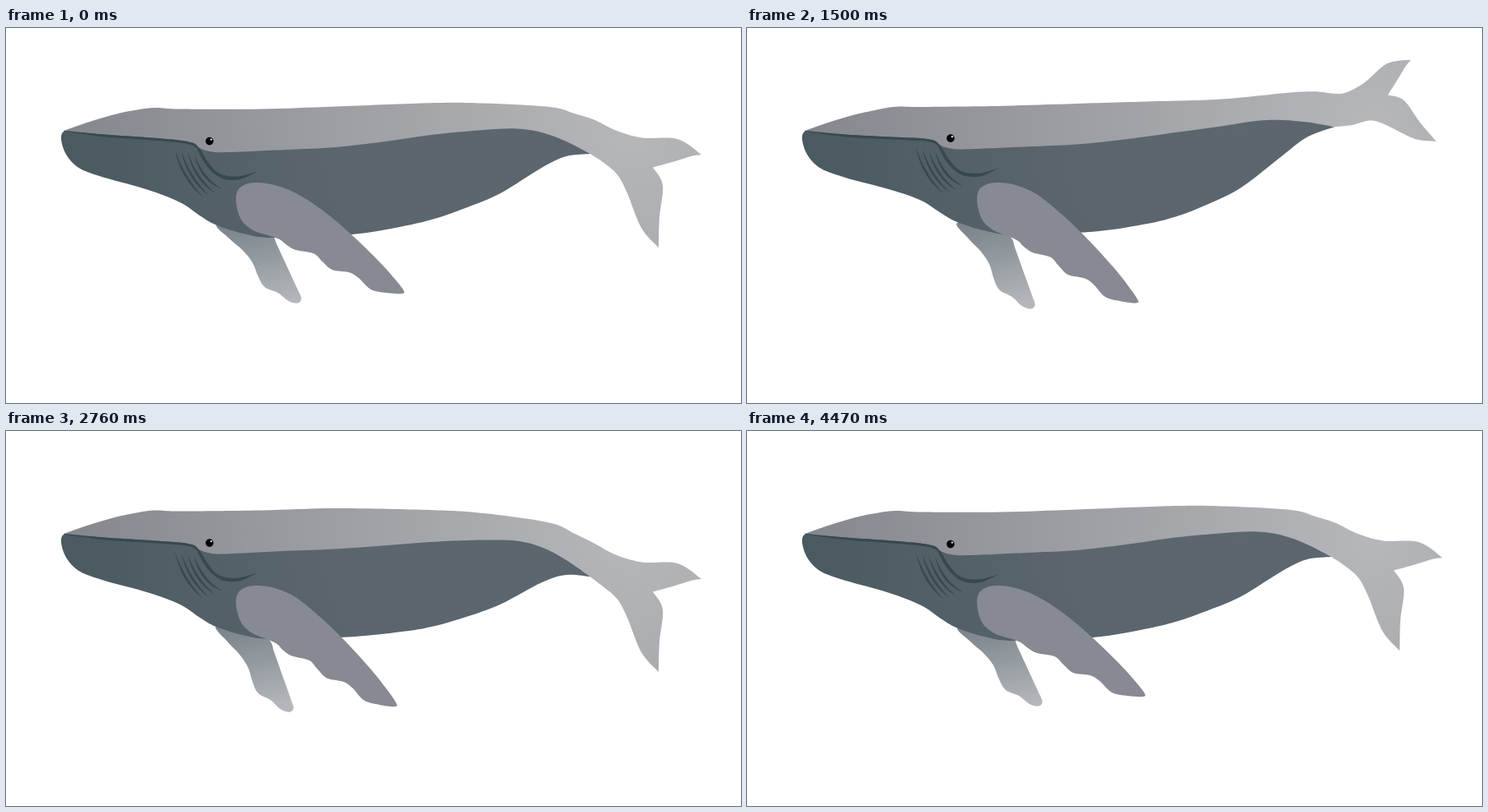
These frames come from a looping animation (892x456 px, 4.5 s). An HTML page:

```html
<!DOCTYPE html>
<html lang="en">
<head>
<meta charset="utf-8">
<title>Swimming whale</title>
<style>
html, body { margin: 0; width: 100%; height: 100%; overflow: hidden; background: #fff; }
svg { display: block; width: 100%; height: 100%; }
</style>
</head>
<body>
<svg viewBox="0 0 892 456" xmlns="http://www.w3.org/2000/svg">
  <defs>
    <radialGradient id="skin" gradientUnits="userSpaceOnUse" cx="760" cy="125" r="690">
      <stop offset="0" stop-color="#b6b7bb"/>
      <stop offset=".2" stop-color="#acaeb2"/>
      <stop offset=".4" stop-color="#a2a4a8"/>
      <stop offset=".75" stop-color="#92949a"/>
      <stop offset="1" stop-color="#84878d"/>
    </radialGradient>
    <radialGradient id="dark" gradientUnits="userSpaceOnUse" cx="600" cy="120" r="560">
      <stop offset="0" stop-color="#5c666e"/>
      <stop offset=".38" stop-color="#5b656d"/>
      <stop offset="1" stop-color="#48595f"/>
    </radialGradient>
    <linearGradient id="shade" gradientUnits="userSpaceOnUse" x1="290" y1="238" x2="312" y2="338">
      <stop offset="0" stop-color="#7b858b"/>
      <stop offset="1" stop-color="#b3b6ba"/>
    </linearGradient>
  </defs>
  <path id="farFin" fill="url(#shade)"/>
  <path id="top" fill="url(#skin)"/>
  <path id="belly" fill="url(#dark)"/>
  <path id="mouth" fill="#37494f"/>
  <path id="folds" fill="#37494f"/>
  <g id="eye">
    <circle r="4.8" fill="#050505"/>
    <circle cx="2" cy="-2" r="1.2" fill="#ddd"/>
  </g>
  <path id="fin" fill="#878a92"/>
</svg>
<script>
const LOOP = 4500, STEP = 30, SPAN = 4470;

// time, then heights of head, middle, loin and tail stock, fluke angle, fin swing
const keys = [
  [0, 0, 0, 0, 0, 0, 0],
  [1080, -4.5, -6, -10, -23, -30, .54],
  [1500, -3.5, -3, -13, -36, -42, .72],
  [1960, -2.7, -1, -16, -56, -54, .94],
  [2280, -2, 3, 0, -23, -35, 1],
  [2760, -1.5, 6.5, 13, 26, 0, .76],
  [3750, -.5, 4, 9.5, 23, 2, .33]
];
const joints = [150, 250, 400, 540, 640, 720];
const pivot = [715, 135];

// Outline at rest.
const back = [
  [70, 125], [100, 114.5], [130, 105.5], [153, 100.5], [180, 97], [212, 98.5], [310, 98.5], [400, 95.5],
  [520, 91], [580, 91.5], [660, 96], [690, 104], [715, 112], [740, 124.5], [772, 133.5], [815, 135], [844, 154]
];
const notch = [[844, 154], [831, 156], [812, 162], [785, 169.5]];
const lobe = [[785, 169.5], [797, 191], [793, 230], [792, 267]];
const stem = [[792, 267], [771, 243], [754, 201], [742, 178.5], [725, 163.5], [709, 153]];
const jaw = [[70, 125], [120, 129.5], [170, 133], [210, 136.5], [228, 140], [236, 146.5], [250, 150.5]];
const seam = [
  ...jaw, [270, 151], [340, 148], [400, 145], [460, 138], [520, 129.5], [580, 124], [620, 122.5],
  [650, 127], [680, 138], [709, 153]
];
const keel = [
  [709, 153], [680, 156], [650, 170], [600, 201], [560, 218], [520, 232], [480, 241.5], [420, 251],
  [325, 255], [290, 250.5], [255, 239.5], [235, 228], [215, 214], [190, 203], [160, 193], [132, 185.5],
  [107, 178], [90, 171], [79, 162], [71, 150], [67, 136], [68, 128], [72, 125]
];
const cheek = [[228, 140], [236, 148], [245, 163], [259, 177], [281, 180.5], [306, 174]];
const fold = [[306, 174], [284, 184], [264, 183.5], [249, 174], [239, 161], [231, 146], [224, 142]];

const finPts = [
  [300, 246], [286, 234], [279.5, 214], [281, 198], [291, 190], [306, 188], [326, 191],
  [352, 201], [386, 223], [420, 252], [450, 281], [470, 303], [482.5, 319], [480, 323],
  [462, 322], [443, 318], [428, 304], [416, 297], [396, 294], [384, 284], [373, 274],
  [352, 270], [341, 264], [332, 257], [318, 252]
];
const farPts = [
  [256, 238], [271, 256], [287, 270], [299, 285], [306, 302], [314, 315], [330, 322],
  [343, 332], [354, 334.5], [358.5, 329], [354, 318], [341, 290], [329, 264], [322, 250], [300, 235]
];

const el = id => document.getElementById(id);
const at = p => p.map(v => v.toFixed(2)).join(" ");
const draw = (id, d) => el(id).setAttribute("d", d);
const clamp = v => Math.max(0, Math.min(1, v));
const shift = (pts, dy) => pts.map(([x, y]) => [x, y + dy]);
const flip = pts => pts.slice().reverse();

function turn([x, y], [cx, cy], deg, size = 1) {
  const a = deg * Math.PI / 180, c = Math.cos(a) * size, s = Math.sin(a) * size;
  return [cx + (x - cx) * c - (y - cy) * s, cy + (x - cx) * s + (y - cy) * c];
}

// Smooth value at u between b and c, with outer neighbours a and d and spacing-aware slopes.
function hermite(b, c, m0, m1, u) {
  const v = 1 - u;
  return b + (c - b) * u * u * (3 - 2 * u) + m0 * u * v * v - m1 * u * u * v;
}

// Pose at a time, interpolated around the loop.
function poseAt(t) {
  const k = keys.length, row = i => keys[(i + k) % k];
  const time = i => row(i)[0] + Math.floor(i / k) * SPAN;
  let i = k - 1;
  while (time(i) > t) i--;
  const h = time(i + 1) - time(i), u = (t - time(i)) / h;
  const slope = (j, c) => (row(j + 1)[c] - row(j - 1)[c]) / (time(j + 1) - time(j - 1)) * h;
  return row(i).slice(1).map((b, j) => hermite(b, row(i + 1)[j + 1], slope(i, j + 1), slope(i + 1, j + 1), u));
}

// Height of the bent spine at x; straight before the head and after the stock.
function bend(x, v) {
  const last = joints.length - 1;
  if (x <= joints[0]) return v[0];
  if (x >= joints[last]) return v[last];
  let i = 0;
  while (joints[i + 1] < x) i++;
  const h = joints[i + 1] - joints[i];
  const slope = j => {
    const a = Math.max(0, j - 1), b = Math.min(last, j + 1);
    return (v[b] - v[a]) / (joints[b] - joints[a]) * h;
  };
  return hermite(v[i], v[i + 1], slope(i), slope(i + 1), (x - joints[i]) / h);
}

// Bends the body along the spine and turns the flukes about the stock.
function warper([head, mid, loin, stock, angle]) {
  const heights = [0, head, head, mid, loin, stock];
  const size = 1 + .165 * Math.sin(2 * angle * Math.PI / 180);
  return pts => pts.map(([x, y]) => {
    const u = clamp((x - 690) / 60), w = u * u * (3 - 2 * u);
    return turn([x, y + bend(x, heights)], [pivot[0], pivot[1] + stock], angle * w, 1 + (size - 1) * w);
  });
}

// Smooth curve through points, continuing from the first one.
function curve(p, closed) {
  const c = p.length, get = i => closed ? p[(i + c) % c] : p[Math.max(0, Math.min(c - 1, i))];
  let d = "";
  for (let i = 0; i < (closed ? c : c - 1); i++) {
    const [a, b, e, f] = [get(i - 1), get(i), get(i + 1), get(i + 2)];
    d += "C" + at([b[0] + (e[0] - a[0]) / 6, b[1] + (e[1] - a[1]) / 6]) + " " +
      at([e[0] - (f[0] - b[0]) / 6, e[1] - (f[1] - b[1]) / 6]) + " " + at(e);
  }
  return d;
}
const path = (...parts) => "M" + at(parts[0][0]) + parts.map(p => curve(p)).join("") + "Z";
const blob = p => "M" + at(p[0]) + curve(p, true) + "Z";

function render(t) {
  const pose = poseAt(t), warp = warper(pose), swing = pose[5];
  const edge = warp(seam);

  draw("top", path(warp(back), warp(notch), warp(lobe), warp(stem),
    [edge[edge.length - 1], ...flip(shift(edge.slice(0, -1), 1.2))]));
  draw("belly", path(edge, warp(keel)));

  const lip = jaw.slice(0, 5), rim = shift(lip.slice(1, 4), 3);
  draw("mouth", path(warp(lip), warp(cheek), warp(fold),
    warp([fold[fold.length - 1], ...flip(rim), [70, 125.5]])));

  let folds = "";
  for (let i = 0; i < 4; i++) {
    const x = 205 + 7.7 * i, y = 147.5 + 1.6 * i, bow = y + 35 - i;
    const [a, b, c, d] = warp([[x, y], [x + 11, bow - 2], [x + 34, 205 - i * i], [x + 7, bow + 2]]);
    folds += `M${at(a)}Q${at(b)} ${at(c)}Q${at(d)} ${at(a)}Z`;
  }
  draw("folds", folds);
  el("eye").setAttribute("transform", `translate(${at(warp([[247, 137.6]])[0])})`);

  const reach = ([x, y]) => clamp((x + y - 520) / 80);
  draw("fin", blob(finPts.map(p => turn(p, [300, 200], 5.2 * swing * reach(p)))));
  draw("farFin", blob(farPts.map(p => turn(p, [270, 230], 7 * swing))));
}

const start = performance.now();
function tick() {
  const t = (performance.now() - start) % LOOP;
  render(Math.floor(t / STEP) * STEP % SPAN);
  requestAnimationFrame(tick);
}
tick();
</script>
</body>
</html>
```
